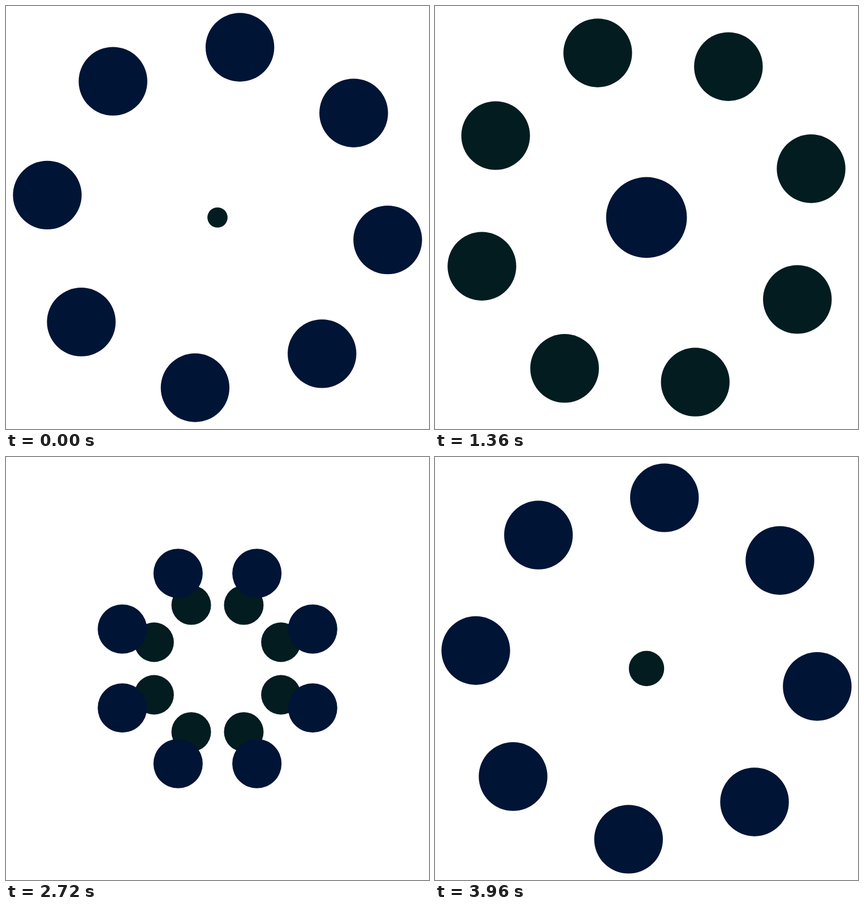
Write an HTML page with a canvas that moves like this. It is 748x748 px and loops after 4000 ms.

```html
<!DOCTYPE html>
<html lang="en">
<head>
<meta charset="utf-8">
<title>Orbiting discs</title>
<style>
  html, body { margin: 0; width: 100%; height: 100%; overflow: hidden; background: #fff; }
  canvas { display: block; width: 748px; height: 748px; }
</style>
</head>
<body>
<canvas id="stage" width="748" height="748"></canvas>
<script>
const ctx = document.getElementById("stage").getContext("2d");
const SIZE = 748, CENTER = SIZE / 2;
const STEP_MS = 40, STEPS = 100;
const COUNT = 8, ORBIT = 425 / 1.4;
const SMALL = 25 / 1.4, LARGE = 85 / 1.4, PEAK = ORBIT / 2;
const GREEN = "#021c20", NAVY = "#001436";

const lerp = (a, b, k) => a + (b - a) * k;
const clamp = k => Math.max(0, Math.min(1, k));

// Phase p: turn 0-30, contract 20-50, pulse in the centre 50-70, expand 70-100.
function pose(p) {
  const spread = p < 50 ? clamp((50 - p) / 30) : clamp((p - 70) / 30);
  const pulse = clamp(1 - Math.abs(p - 60) / 10);
  return {
    orbit: ORBIT * spread,
    radius: pulse > 0 ? lerp(SMALL, PEAK, pulse) : lerp(SMALL, LARGE, spread),
    angle: lerp(-22.5, 22.5, clamp(p / 30)) * Math.PI / 180
  };
}

function drawRing(p, color) {
  const { orbit, radius, angle } = pose(p);
  const discs = orbit > 0 ? COUNT : 1;
  ctx.fillStyle = color;
  for (let i = 0; i < discs; i++) {
    const a = angle + i * 2 * Math.PI / COUNT;
    ctx.beginPath();
    ctx.arc(CENTER + orbit * Math.sin(a), CENTER - orbit * Math.cos(a), radius, 0, 2 * Math.PI);
    ctx.fill();
  }
}

function draw(time) {
  const step = Math.floor(time / STEP_MS) % STEPS;
  ctx.fillStyle = "#fff";
  ctx.fillRect(0, 0, SIZE, SIZE);
  drawRing((step + 70) % STEPS, GREEN);
  drawRing((step + 20) % STEPS, NAVY);
}

const start = performance.now();
function tick() {
  draw(performance.now() - start);
  requestAnimationFrame(tick);
}
tick();
</script>
</body>
</html>
```
